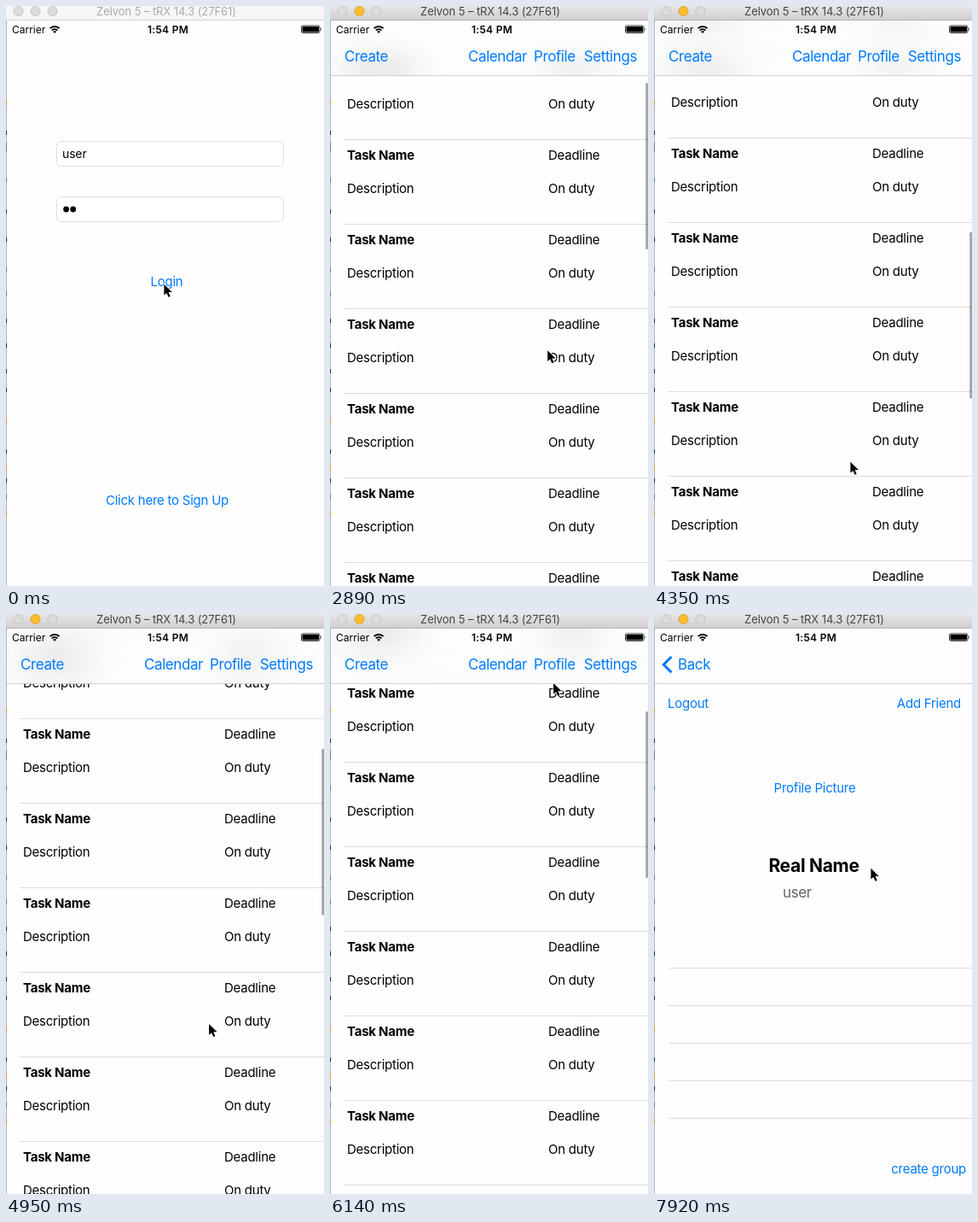
These frames come from a looping animation (373x679 px, 8000 ms). An HTML page:

```html
<!DOCTYPE html>
<html lang="en">
<head>
<meta charset="utf-8">
<title>Task list</title>
<style>
html, body { margin: 0; width: 100%; height: 100%; overflow: hidden; background: #fefefe; }
svg { display: block; width: 100vw; height: 100vh; }
text { font: 15px Inter, "Open Sans", sans-serif; letter-spacing: -.24px; white-space: pre; }
.bold { font-weight: 700; }
.link { fill: #007aff; }
.nav { font-size: 17px; letter-spacing: -.41px; fill: #007aff; }
.field { font-size: 14px; letter-spacing: -.15px; }
.name { font-size: 21px; font-weight: 700; letter-spacing: -.3px; }
.user { font-size: 17px; letter-spacing: -.41px; fill: #666; }
.status { font-size: 12px; letter-spacing: 0; }
.clock { font-size: 12px; font-weight: 600; letter-spacing: .3px; }
.title { font-size: 13px; letter-spacing: -.08px; }
</style>
</head>
<body>
<svg viewBox="0 0 373 679">
  <defs>
    <linearGradient id="chrome" x2="0" y2="1">
      <stop stop-color="#e7e5e7"/><stop offset="1" stop-color="#d1cfd1"/>
    </linearGradient>
    <clipPath id="bar"><rect y="17" width="373" height="64"/></clipPath>
    <clipPath id="under"><rect y="-40" width="373" height="121"/></clipPath>
    <filter id="soft" filterUnits="userSpaceOnUse" x="-80" y="-80" width="540" height="260">
      <feGaussianBlur stdDeviation="22 18"/>
    </filter>
  </defs>
  <g id="login"></g>
  <g id="modal">
    <g id="list">
      <rect width="373" height="700" y="17" fill="#fefefe"/>
      <g id="rows"></g>
      <rect id="thumb" x="370.3" width="2.7" height="195" rx="1.3" fill="#000" fill-opacity=".36"/>
    </g>
    <rect id="shade" y="81" width="373" height="598"/>
    <g id="profile"></g>
    <rect y="17" width="373" height="64" fill="#fdfdfd"/>
    <g id="menu">
      <g clip-path="url(#bar)"><g filter="url(#soft)" opacity=".7"><g clip-path="url(#under)"><use href="#rows"/></g></g></g>
    </g>
    <g id="back"><path d="M20.5 50 11.3 59.2l9.2 9.2" fill="none" stroke="#007aff" stroke-width="3"/></g>
    <rect y="81" width="373" height="1" fill="#cfcfcf"/>
  </g>
  <g id="status">
    <g fill="none" stroke="#000" stroke-width="1.9">
      <path d="M51.6 26.2a7.8 7.8 0 0 1 11 0M53.8 28.5a4.7 4.7 0 0 1 6.6 0"/>
    </g>
    <path d="M57.1 32l-1.9-2a2.7 2.7 0 0 1 3.8 0z"/>
    <rect x="346.5" y="23" width="21.5" height="8.5" rx="1.8" fill="none" stroke="#000" stroke-width=".8"/>
    <rect x="347.5" y="24" width="19.5" height="6.5" rx=".8"/>
    <path d="M369 25.4q1.6 1.8 0 3.6z"/>
  </g>
  <g id="window">
    <rect id="strip" width="373" height="16"/>
    <rect id="rim" y="16" width="373" height="1"/>
  </g>
  <g id="edge"><rect y="17" width="1" height="662" fill="#b4b4b4"/></g>
  <path id="cursor" d="M.4 .8V13.6l3-2.7 2.2 4.9 2.1-.9-2.1-4.8h4.2z" stroke="#fff" stroke-width="1.4" paint-order="stroke"/>
</svg>
<script>
const $ = id => document.getElementById(id);
const add = (id, markup) => $(id).insertAdjacentHTML('beforeend', markup);
const label = (x, y, text, type = '', anchor = 'start') =>
  `<text x="${x}" y="${y}" class="${type}" text-anchor="${anchor}">${text}</text>`;
const line = (x, y) => `<rect x="${x}" y="${y}" width="${390 - x}" height="1" fill="#dddddf"/>`;
const set = (id, attrs) => { for (const k in attrs) $(id).setAttribute(k, attrs[k]); };
const move = (id, x, y) => set(id, { transform: `translate(${x} ${y})` });
const clamp = v => Math.max(0, Math.min(1, v));

const box = y => `<rect x="59.5" y="${y}" width="266" height="29" rx="5" fill="#fff" stroke="#dedede"/>`;
add('login', box(158.5) + box(223.5) + label(66, 178, 'user', 'field')
  + '<circle cx="70.6" cy="238" r="3.4"/><circle cx="78.7" cy="238" r="3.4"/>'
  + `<g id="enter">${label(188.5, 327.5, 'Login', 'link', 'middle')}</g>`
  + label(189, 583.5, 'Click here to Sign Up', 'link', 'middle'));

for (let i = 0; i < 20; i++) {
  const y = 81 + 99 * i;
  add('rows', label(20, y + 22.5, 'Task Name', 'bold') + label(256, y + 22.5, 'Deadline')
    + label(20, y + 61.5, 'Description') + label(256, y + 61.5, 'On duty') + line(16, y + 98));
}

add('menu', label(17, 65, 'Create', 'nav') + label(162, 65, 'Calendar', 'nav')
  + `<g id="tab">${label(239, 65, 'Profile', 'nav')}</g>` + label(360, 65, 'Settings', 'nav', 'end'));
add('back', label(28, 65, 'Back', 'nav'));

add('profile', '<rect y="17" width="373" height="700" fill="#fefefe"/>'
  + label(16, 109.5, 'Logout', 'link') + label(360, 109.5, 'Add Friend', 'link', 'end')
  + label(188.5, 208.5, 'Profile Picture', 'link', 'middle')
  + label(187.5, 301.5, 'Real Name', 'name', 'middle') + label(151, 331.5, 'user', 'user')
  + [414, 458, 502, 546, 590].map(y => line(17, y)).join('')
  + label(366, 654.5, 'create group', 'link', 'end'));

add('status', label(7, 31.5, 'Carrier', 'status') + label(190, 31.5, '1:54 PM', 'clock', 'middle'));
add('window', [14.5, 34.5, 54.5].map((x, i) =>
  `<circle id="dot${i}" cx="${x}" cy="6" r="5.5" fill="#dcdcdc" stroke="#c6c4c6"/>`).join('')
  + `<g id="caption">${label(188, 11, 'Zelvon 5 – tRX 14.3 (27F61)', 'title', 'middle')}</g>`);

// Slivers of the window behind
const specks = { '#d9902f': [111, 484, 537, 591], '#1d2a6b': [271, 395, 519, 553], '#2c86c8': [201],
  '#333': [146, 238, 366, 425, 447], '#777': [160, 165, 306, 334, 572] };
for (const c in specks)
  for (const y of specks[c]) add('edge', `<rect y="${y}" width="1" height="5" fill="${c}"/>`);

const bursts = [500, 2890, 4060, 5250, 6430, 7620];
function stepTime(t) {
  const start = bursts.filter(b => b <= t).pop();
  return start ? start + 145 * Math.min(7, Math.floor((t - start) / 145)) : 0;
}

const path = [[0, 185, 325], [950, 185, 325], [1500, 261, 454], [2860, 261, 454], [3010, 230, 196],
  [3880, 230, 196], [4060, 230, 533], [4800, 230, 533], [5540, 274, 227], [6200, 260, 60],
  [7480, 260, 60], [7900, 254, 297], [8000, 254, 297]];
function pointer(t) {
  const i = path.findIndex(p => p[0] > t), [t0, x0, y0] = path[i - 1], [t1, x1, y1] = path[i];
  const p = (t - t0) / (t1 - t0);
  return [x0 + (x1 - x0) * p, y0 + (y1 - y0) * p];
}

// Two flicks, each a drag followed by exponential slowing
const flickUp = t => 258 + 1330 * (1 - Math.exp((3010 - t) / 500));
const flickDown = t => 90.1 + 529 * Math.exp((4350 - t) / 497);
function scrollAt(t) {
  if (t < 2860) return 0;
  if (t < 3010) return 258 * ((t - 2860) / 150) ** 1.5;
  if (t < 3880) return flickUp(t);
  if (t < 4060) return flickUp(3880) + (flickDown(4060) - flickUp(3880)) * (t - 3880) / 180;
  return flickDown(t);
}

function draw(time) {
  const t = stepTime(time), active = t >= 500;
  set('strip', { fill: active ? 'url(#chrome)' : '#f6f6f6' });
  set('rim', { fill: active ? '#b5b3b5' : '#d4d4d4' });
  set('dot1', { fill: active ? '#fdbe32' : '#dcdcdc', stroke: active ? '#dfa023' : '#c6c4c6' });
  set('caption', { fill: active ? '#454545' : '#aaa' });

  set('enter', { opacity: t > 600 && t < 850 ? .25 : 1 });
  move('modal', 0, 667 * (1 - clamp((t - 850) / 500)) ** 3);

  const scroll = Math.round(scrollAt(t));
  move('rows', 0, -scroll);
  set('thumb', { y: 83.2 + .2928 * scroll, opacity: t > 2860 ? 1 : 0 });

  const k = Math.max(0, t - 7180) / 60, rest = (1 + k) * Math.exp(-k);
  const swap = clamp((t - 7180) / 270);
  move('list', -112 * (1 - rest), 0);
  move('profile', 375 * rest, 0);
  set('shade', { opacity: .1 * (1 - rest) });
  set('menu', { opacity: 1 - swap });
  set('tab', { opacity: t > 7000 ? .3 : 1 });
  set('back', { opacity: swap });
  move('back', 130 * (1 - swap) ** 2, 0);

  move('cursor', ...pointer(t));
}

const begin = performance.now();
function tick() {
  draw((performance.now() - begin) % 8000);
  requestAnimationFrame(tick);
}
tick();
</script>
</body>
</html>
```
